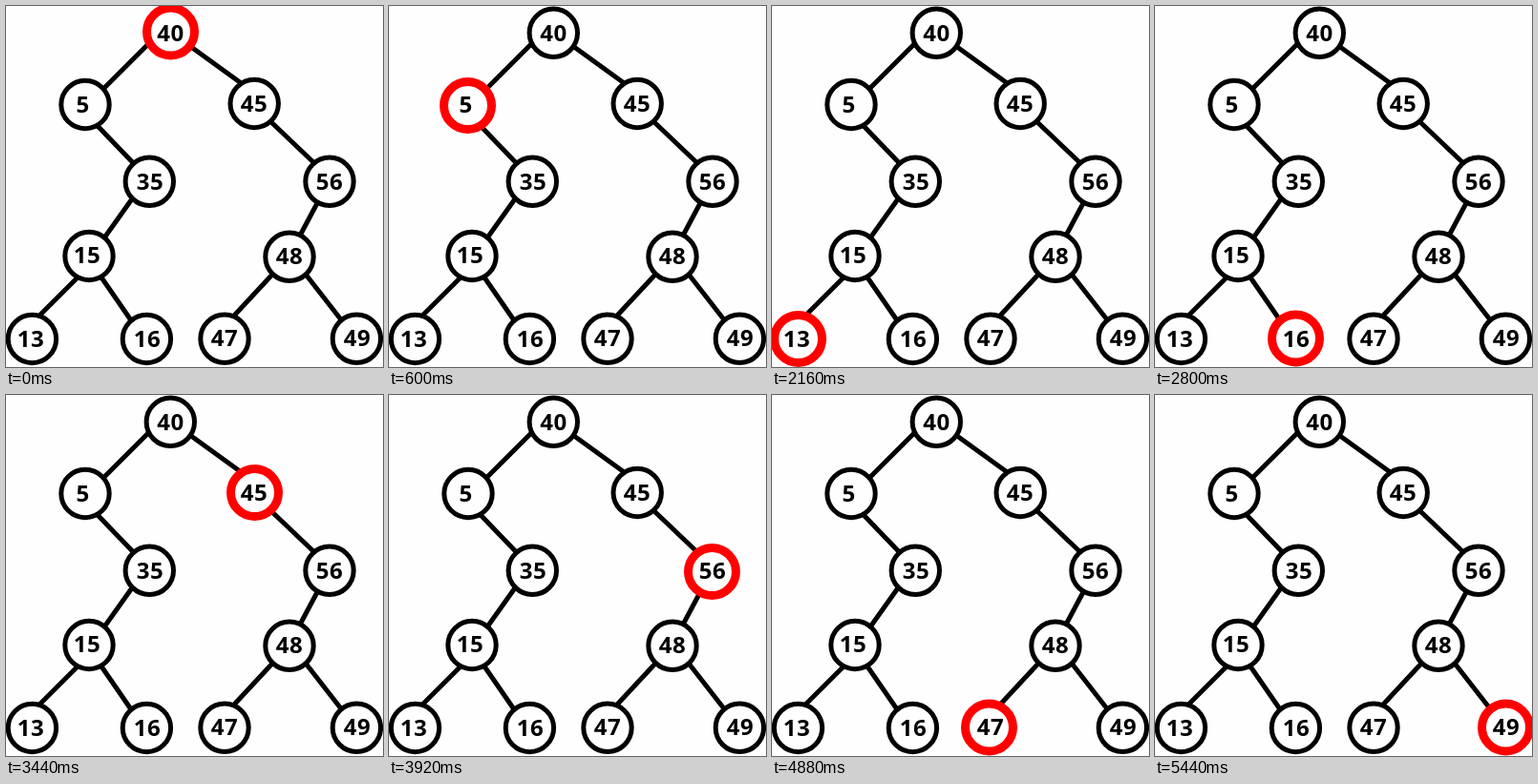
An HTML page with a canvas that plays this animation: 395 px wide and 379 px high, repeating every 6 s.

```html
<!DOCTYPE html>
<html lang="en">
<head>
<meta charset="utf-8">
<title>Preorder traversal</title>
<style>
  html, body { margin: 0; width: 100%; height: 100%; overflow: hidden; background: #fefefe; }
  canvas { display: block; }
</style>
</head>
<body>
<canvas id="stage" width="395" height="379"></canvas>
<script>
const ctx = document.getElementById('stage').getContext('2d');
const PAPER = '#fefefe';
const LOOP = 6000;

// Nodes in visiting order: ring centre, label centre, highlight centre, visit start (ms)
const nodes = [
  { label: '40', ring: [172.3, 28.3],  text: [172.5, 29], mark: [172.5, 27],    at: 0 },
  { label: '5',  ring: [83, 103.5],    text: [80.5, 104], mark: [82.5, 104.5],  at: 600 },
  { label: '35', ring: [150.3, 184.3], text: [151, 185],  mark: [151, 184.5],   at: 1240 },
  { label: '15', ring: [87, 262.5],    text: [85, 262],   mark: [86.5, 262.5],  at: 1720 },
  { label: '13', ring: [27.4, 349.5],  text: [26, 350],   mark: [27.5, 349.5],  at: 2160 },
  { label: '16', ring: [147.4, 349.5], text: [148, 350],  mark: [147.5, 349],   at: 2760 },
  { label: '45', ring: [260.2, 102.5], text: [260, 103],  mark: [260.5, 102.5], at: 3400 },
  { label: '56', ring: [339, 184.3],   text: [339, 185],  mark: [338.5, 185.5], at: 3920 },
  { label: '48', ring: [297, 263.3],   text: [297, 263],  mark: [296.5, 263.5], at: 4440 },
  { label: '47', ring: [229, 349.3],   text: [229, 349],  mark: [227.5, 349],   at: 4880 },
  { label: '49', ring: [367.4, 349.3], text: [368, 349],  mark: [367.5, 349],   at: 5440 }
];

const edges = [
  [148.5, 40.5, 102, 87], [194, 43, 245, 80],
  [96, 126, 132.5, 164], [131, 204, 104, 242],
  [74.5, 285.5, 34.5, 325.5], [100, 285, 131, 330],
  [278, 122, 322, 164], [325, 209, 308, 241],
  [278, 283, 239, 325], [315, 283, 350, 328]
];

function drawRing([x, y], radius, width, color) {
  ctx.beginPath();
  ctx.arc(x, y, radius, 0, Math.PI * 2);
  ctx.fillStyle = PAPER;
  ctx.fill();
  ctx.lineWidth = width;
  ctx.strokeStyle = color;
  ctx.stroke();
}

function drawEdge([x1, y1, x2, y2]) {
  ctx.beginPath();
  ctx.moveTo(x1, y1);
  ctx.lineTo(x2, y2);
  ctx.stroke();
}

function drawTree(active) {
  ctx.fillStyle = PAPER;
  ctx.fillRect(0, 0, 395, 379);

  ctx.lineCap = 'round';
  ctx.lineWidth = 5;
  ctx.strokeStyle = '#000';
  edges.forEach(drawEdge);

  ctx.font = '700 24px "Open Sans", "Noto Sans", sans-serif';
  ctx.letterSpacing = '0.5px';
  ctx.textAlign = 'center';
  ctx.textBaseline = 'alphabetic';
  for (const node of nodes) {
    if (node === active) drawRing(node.mark, 25, 9, '#f00');
    else drawRing(node.ring, 25.2, 5, '#000');
    ctx.fillStyle = '#000';
    ctx.fillText(node.label, node.text[0], node.text[1] + 8);
  }
}

const start = performance.now();

function frame() {
  const time = (performance.now() - start) % LOOP;
  drawTree(nodes.findLast(node => node.at <= time));
  requestAnimationFrame(frame);
}

frame();
</script>
</body>
</html>
```
